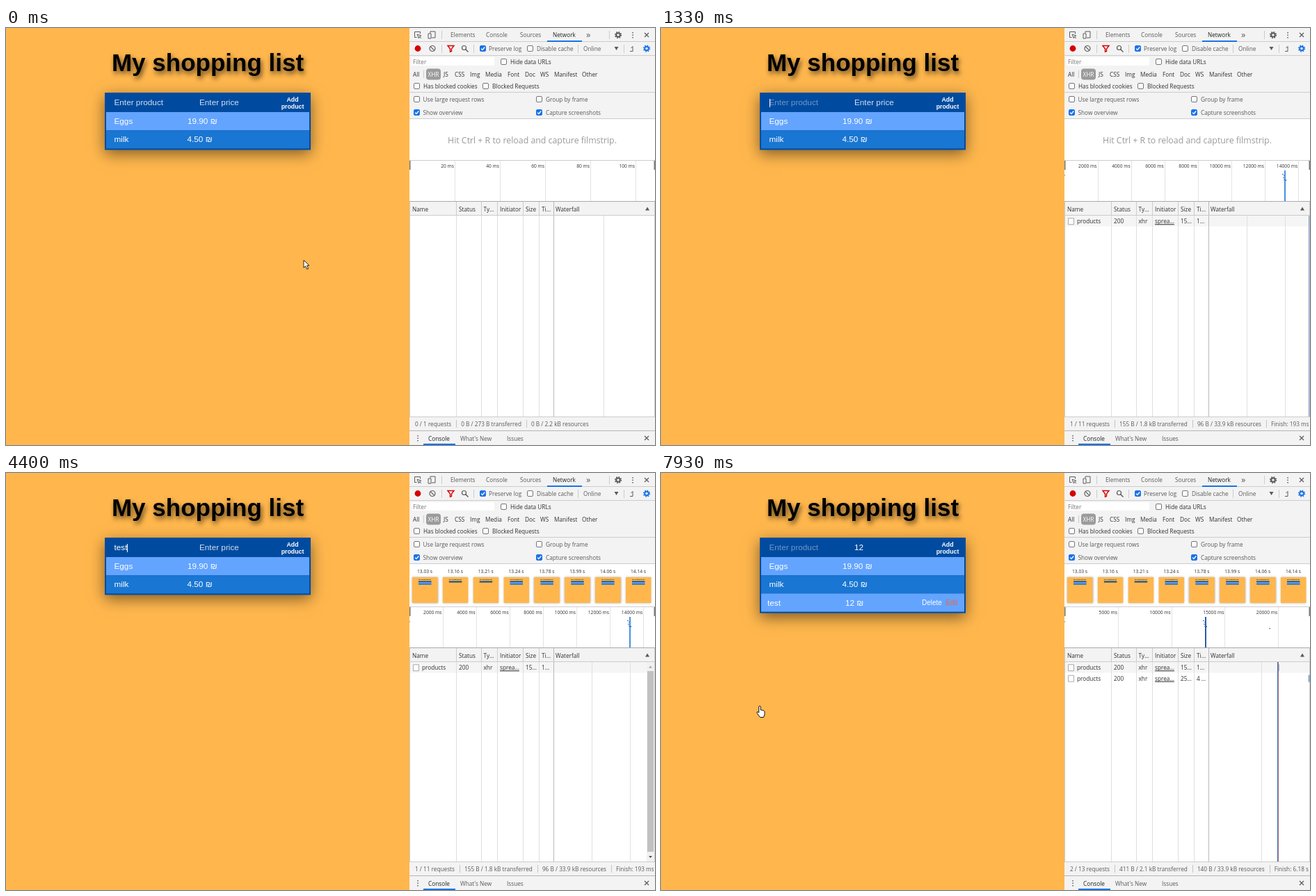
An HTML page with a canvas that plays this animation: 933 by 600 pixels, repeating every 8 s.

```html
<!DOCTYPE html>
<html lang="en">
<head>
<meta charset="utf-8">
<title>Shopping list</title>
<style>
html, body { margin: 0; height: 100%; overflow: hidden; }
canvas { display: block; }
</style>
</head>
<body>
<canvas width="933" height="600"></canvas>
<script>
const ctx = document.querySelector('canvas').getContext('2d');
const FPS = 15, FRAMES = 120;
const DARK = '#303030', GREY = '#5a5a5a', LINE = '#ccc', BAR = '#f3f3f3', BLUE = '#1a73e8';
const ui = px => `${px}px "Open Sans", sans-serif`;
const page = (px, weight = '') => `${weight} ${px}px "Liberation Sans", Arial, sans-serif`;

function rect(x, y, w, h, color) {
  ctx.fillStyle = color;
  ctx.fillRect(x, y, w, h);
}

function text(s, x, y, color = DARK, font = ui(8.25), align = 'left') {
  ctx.fillStyle = color;
  ctx.font = font;
  ctx.textAlign = align;
  ctx.fillText(s, x, y);
  return ctx.measureText(s).width;
}

function path(d, x, y, { fill, stroke, width = 1 }) {
  ctx.save();
  ctx.translate(x, y);
  const p = new Path2D(d);
  if (fill) { ctx.fillStyle = fill; ctx.fill(p); }
  if (stroke) { ctx.strokeStyle = stroke; ctx.lineWidth = width; ctx.stroke(p); }
  ctx.restore();
}

function ring(x, y, r, color, width, dash = []) {
  ctx.beginPath();
  ctx.arc(x, y, r, 0, 7);
  ctx.setLineDash(dash);
  ctx.strokeStyle = color;
  ctx.lineWidth = width;
  ctx.stroke();
  ctx.setLineDash([]);
}

function shadow(color, blur, dx, dy, draw) {
  ctx.save();
  Object.assign(ctx, { shadowColor: color, shadowBlur: blur, shadowOffsetX: dx, shadowOffsetY: dy });
  draw();
  ctx.restore();
}

// ---- Timeline (all times in frames) ----

const moves = [
  [[0, 428, 334], [1, 340, 305], [2, 281, 285], [16, 281, 285]],
  [[29, 281, 285], [33, 95, 223], [36, -30, 211]],
  [[100, 29, 214], [104, 155, 217], [113, 155, 217], [115, 118, 275],
   [116, 112, 305], [117, 114, 328], [118, 130, 335], [119, 142, 335], [121, 142, 335]]
];

function pointer(f) {
  for (const keys of moves) {
    for (let i = 1; i < keys.length; i++) {
      const [a, ax, ay] = keys[i - 1], [b, bx, by] = keys[i];
      if (f >= a && f < b) {
        const k = (f - a) / (b - a);
        return { x: ax + (bx - ax) * k, y: ay + (by - ay) * k };
      }
    }
  }
  return null;
}

// The pointer is shown offset and enlarged; this gives the spot it acts on.
const target = p => p ? { x: (p.x + 482) / 1.5, y: (p.y - 59) / 1.5 } : { x: -1, y: -1 };

// Each event: frame, focused field, product text, price text.
const events = [
  [0, '', '', ''], [19, 'product', '', ''],
  [57, 'product', 't', ''], [58, 'product', 'te', ''],
  [61, 'product', 'tes', ''], [66, 'product', 'test', ''],
  [71, 'price', 'test', ''], [91, 'price', 'test', '1'],
  [94, 'price', 'test', '12'], [105, 'product', '', '12']
];

// ---- Shopping list ----

const items = [['Eggs', '19.90 ₪', 261], ['milk', '4.50 ₪', 260.5], ['test', '12 ₪', 265]];

function field(name, value, x, focus, caretOn) {
  const focused = focus === name, font = page(11.75);
  const color = value ? '#fff' : focused ? '#7096c8' : '#d3dfee';
  const width = text(value || 'Enter ' + name, x, 111.2, color, font);
  if (focused && caretOn) rect(Math.round(x + (value ? width : 0)), 102, 1, 12, '#fff');
}

function drawList(f, at) {
  rect(0, 0, 580, 600, '#ffb74d');
  shadow('rgba(0,0,0,.65)', 7, 2, 4, () =>
    text('My shopping list', 290, 61.5, '#000', page(35, 'bold'), 'center'));

  const count = f >= 107 ? 3 : f >= 16 && f < 19 ? 0 : 2;
  const height = 30 + count * 26.2;
  shadow('rgba(0,0,0,.5)', 20, 0, 6, () => rect(142, 93, 296, height, '#004ba0'));

  const [start, focus, product, price] = events.filter(e => e[0] <= f).pop();
  const caretOn = Math.floor((f - start) / 8) % 2 === 0;
  field('product', product, 155.5, focus, caretOn);
  field('price', price, 278, focus, caretOn);
  text('Add', 412, 105.5, '#fff', page(8.8, 'bold'), 'center');
  text('product', 412, 116.3, '#fff', page(8.8, 'bold'), 'center');

  items.slice(0, count).forEach(([name, cost, x], i) => {
    const y = 121 + i * 26.2;
    const hover = at.x > 142 && at.x < 438 && at.y >= y && at.y < y + 26.2;
    rect(144, y, 292, 26.2, i % 2 ? '#1976d2' : '#63a4ff');
    text(name, hover ? 153 : 155.5, y + 17.2, '#fff', page(11.75));
    text(cost, x, y + 17.2, '#fff', page(11.75));
    if (hover) {
      text('Delete', 375, y + 16.6, at.x < 406 ? '#f4623a' : '#fff', page(10));
      text('Edit', 409, y + 16.6, at.x >= 406 ? '#f4623a' : '#fff', page(10));
    }
  });
}

// ---- Network panel ----

const networks = [
  { first: 645, step: 65, unit: 20, ticks: 5, grid: [859],
    status: ['0 / 1 requests', '0 B / 273 B transferred', '0 B / 2.2 kB resources'] },
  { first: 645, step: 65, unit: 20, ticks: 5, grid: [842, 897], mark: 896,
    status: ['0 / 7 requests', '0 B / 1.3 kB transferred', '0 B / 24.5 kB resources', 'Finish: 82 ms', 'DOMContentLoaded: 82 ms'] },
  { first: 627.5, step: 48.1, unit: 2000, ticks: 7, grid: [842, 897], mark: 896,
    rows: [['15…', '1…', 931]],
    status: ['1 / 11 requests', '155 B / 1.8 kB transferred', '96 B / 33.9 kB resources', 'Finish: 193 ms'] },
  { first: 657, step: 76.7, unit: 5000, ticks: 4, grid: [863], mark: 782,
    rows: [['15…', '1…', 887], ['25…', '4 …', 931]],
    status: ['2 / 13 requests', '411 B / 2.1 kB transferred', '140 B / 33.9 kB resources', 'Finish: 6.18 s'] }
];
const columns = [584, 651, 686.5, 710, 747, 770, 790];

function hline(y, color = LINE) { rect(580, y, 353, 1, color); }
function vline(x, y, h, color = LINE) { rect(Math.round(x), y, 1, h, color); }

function checkbox(x, y, label, labelX, checked, color = GREY) {
  ctx.beginPath();
  ctx.roundRect(x + .5, y + .5, 8, 8, 1.5);
  ctx.fillStyle = checked ? BLUE : '#fff';
  ctx.fill();
  ctx.strokeStyle = checked ? BLUE : '#767676';
  ctx.lineWidth = 1;
  ctx.stroke();
  if (checked) path('M2 4.6l1.9 1.9 3.4-4', x, y, { stroke: '#fff', width: 1.3 });
  text(label, labelX, y + 7.8, color);
}

function gear(x, y, color) {
  ring(x, y, 2.8, color, 2);
  ring(x, y, 4.3, color, 1.7, [1.7, 1.68]);
}

function dots(x, y) {
  for (const dy of [-4, -.5, 3]) rect(x - .7, y + dy, 1.5, 1.5, GREY);
}

function cross(x, y) {
  path('M-3-3l6 6M3-3l-6 6', x, y, { stroke: GREY, width: 1.2 });
}

function drawToolbars(f) {
  rect(580, 0, 353, 600, BAR);

  path('M8.5 3.5v-3h-8v8h3M4 4l6 2.3-2.6 1L6.5 10zM7.5 7.5l2.5 2.5', 587, 5, { stroke: GREY });
  path('M3.5 2.5v-2h7v9h-5M.5 3.5h4v7h-4z', 606.5, 4.5, { stroke: GREY });
  const tabs = [['Elements', 639], ['Console', 690], ['Sources', 739], ['Network', 786]];
  tabs.forEach(([s, x]) => text(s, x, 13, s === 'Network' ? '#222' : GREY));
  text('»', 834, 13.5, GREY, ui(13));
  gear(880, 10, GREY);
  dots(901, 10);
  cross(921, 10);
  hline(19);
  rect(778, 18, 50, 2, BLUE);

  ctx.beginPath();
  ctx.arc(592, 29.5, 4.4, 0, 7);
  ctx.fillStyle = '#d50000';
  ctx.fill();
  ring(613, 29.5, 4, GREY, 1.2);
  path('M-2.8-2.8l5.6 5.6', 613, 29.5, { stroke: GREY, width: 1.2 });
  path('M-4.5-4h9L1 .5V4l-2 .7V.5z', 639.5, 29.5, { stroke: '#d50000', width: 1.4 });
  ring(658.5, 28.5, 3, GREY, 1.2);
  path('M2 2l4 4', 658.5, 28.5, { stroke: GREY, width: 1.4 });
  checkbox(681, 25, 'Preserve log', 694, true);
  checkbox(749, 25, 'Disable cache', 763, false);
  text('Online', 830, 33, GREY);
  path('M-3-2.5h6L0 2.5z', 877.5, 29.5, { fill: GREY });
  path('M1 4V-3l-2.5 2.5M-3 4h4', 900, 29.5, { stroke: GREY });
  gear(921, 29.5, BLUE);
  for (const x of [626, 867]) vline(x, 4, 12);
  for (const x of [626, 672, 822, 888]) vline(x, 24, 12);
  hline(39);

  if (f >= 14 && f < 16) rect(582, 41, 121, 14, '#dadce0');
  rect(583, 42, 119, 12, '#fff');
  text('Filter', 585, 52, '#757575');
  checkbox(711, 44, 'Hide data URLs', 725, false, DARK);

  ctx.beginPath();
  ctx.roundRect(604, 58.5, 21, 16, 4);
  ctx.fillStyle = '#9b9b9b';
  ctx.fill();
  vline(600, 61, 11);
  const types = [['All', 585], ['JS', 629], ['CSS', 645], ['Img', 667], ['Media', 689], ['Font', 721],
    ['Doc', 746], ['WS', 768], ['Manifest', 788], ['Other', 828]];
  types.forEach(([s, x]) => text(s, x, 70));
  text('XHR', 606.5, 70, '#fff');
  checkbox(586, 79, 'Has blocked cookies', 600, false, DARK);
  checkbox(685, 79, 'Blocked Requests', 699, false, DARK);
  hline(92);
  checkbox(586, 98, 'Use large request rows', 599.5, false);
  checkbox(762, 98, 'Group by frame', 776, false);
  checkbox(586, 117, 'Show overview', 599.5, true);
  checkbox(762, 117, 'Capture screenshots', 776, true);
  hline(130);
}

function drawFilmstrip(film) {
  rect(580, 131, 353, 62, '#fff');
  if (!film) {
    text('Hit Ctrl + R to reload and capture filmstrip.', 756.5, 166, '#9a9a9a', ui(12.35), 'center');
    return;
  }
  const times = [13.03, 13.16, 13.21, 13.24, 13.78, 13.99, 14.06, 14.14];
  times.forEach((time, i) => {
    const x = 584 + i * 43.85;
    text(time.toFixed(2) + ' s', x + 18, 143.5, DARK, ui(6.7), 'center');
    shadow('rgba(0,0,0,.35)', 3, 0, 0, () => rect(x, 150, 36.5, 37, '#ffb74d'));
    text('My shopping list', x + 18, 154.3, '#222', page(2.3, 'bold'), 'center');
    rect(x + 9, 155.5, 18.5, 2, '#004ba0');
    if (i !== 1 && i !== 2) {
      rect(x + 9, 157.2, 18.5, 1.7, '#63a4ff');
      rect(x + 9, 158.9, 18.5, 1.8, '#1976d2');
    }
  });
}

function drawOverview(net, y) {
  rect(580, y, 353, 60, '#fff');
  hline(y);
  for (let i = 0; i < net.ticks; i++) {
    const x = net.first + i * net.step;
    vline(x, y + 1, 58, '#e3e3e3');
    text(`${net.unit * (i + 1)} ms`, x - 1, y + 10.5, DARK, ui(6.7), 'right');
  }
  for (const x of [580, 931.5]) rect(x, y + 1, 1.5, 13, '#777');
  if (net.mark) {
    const late = net.mark < 800;
    rect(580, y + 21, 1, 2, '#90b8e8');
    rect(net.mark, y + 15, net.rows ? 2 : 1, 44, late ? '#2c5aa8' : '#4a90e2');
    for (const [dx, dy] of [[-3, 20], [-1, 22], [-2, 25], [-1, 28]])
      rect(net.mark + dx, y + dy, 2, 1, '#3b78c4');
    if (net.rows) rect(net.mark + 2, y + 28, 1, 2, '#3b78c4');
    if (late) rect(874.5, y + 31, 1.5, 1.5, '#3b78c4');
  }
  hline(y + 59, '#aaa');
}

function drawTable(net, y, scrollbar) {
  const rows = net.rows || [];
  rect(580, y, 353, 559 - y, '#fff');
  rect(580, y, 353, 19, BAR);
  rows.forEach((row, i) => { if (i % 2 === 0) rect(581, y + 20, 351, 15.5, '#f5f5f5'); });
  for (const x of net.grid) vline(x, y + 20, 539 - y, '#e0e0e0');
  for (const x of [647, 683, 706, 743, 766]) {
    vline(x, y, 19, LINE);
    vline(x, y + 20, 539 - y, '#dedede');
  }
  vline(786.5, y, 559 - y, '#b8b8b8');
  hline(y + 19);
  ['Name', 'Status', 'Ty…', 'Initiator', 'Size', 'Ti…', 'Waterfall'].forEach((s, i) =>
    text(s, columns[i], y + 13.5));
  path('M-3 2.5h6L0-2.5z', 922, y + 10, { fill: GREY });

  rows.forEach(([size, time, barX], i) => {
    const base = y + 31.2 + i * 15.5;
    path('M.5.5h8v9h-8z', 585, base - 8, { fill: '#fff', stroke: '#aaa' });
    text('products', 598, base);
    text('200', columns[1], base);
    text('xhr', columns[2], base);
    const width = text('sprea…', columns[3], base);
    rect(columns[3], base + 1, width, 1, DARK);
    text(size, columns[4], base);
    text(time, columns[5], base);
    if (!scrollbar) rect(barX, base - 8, 1.5, 10, '#3b78c4');
  });
  if (net.mark < 800) {
    rect(886, y + 20, 1, 539 - y, '#3f6fb5');
    rect(887, y + 20, 1, 539 - y, '#b07a78');
  } else if (net.mark && !scrollbar) {
    rect(931, y + 20, 1, 539 - y, '#7f97c8');
  }
  if (scrollbar) {
    rect(921, y + 20, 11, 539 - y, '#f1f1f1');
    rect(922, y + 33, 9, 260, '#c1c1c1');
    path('M-2.5 1.5h5L0-1.5z', 926.5, y + 27, { fill: '#a3a3a3' });
    path('M-2.5-1.5h5L0 1.5z', 926.5, 552.5, { fill: '#505050' });
  }
  vline(580, y, 559 - y, LINE);
  vline(932, y, 559 - y, LINE);
}

function drawFooter(net) {
  rect(580, 559, 353, 41, BAR);
  hline(559);
  ctx.save();
  ctx.beginPath();
  ctx.rect(580, 559, 351, 20);
  ctx.clip();
  let x = 588;
  net.status.forEach((s, i) => {
    if (i) { vline(x, 564, 11, '#c4c4c4'); x += 7; }
    x += text(s, x, 573, i === 4 ? BLUE : GREY) + 7;
  });
  ctx.restore();
  hline(579, '#b5b5b5');
  dots(592, 590);
  text('Console', 607, 593.5, '#222');
  text("What's New", 653, 593.5, GREY);
  text('Issues', 720, 593.5, GREY);
  cross(921, 590);
  rect(600, 598, 46, 2, BLUE);
}

// ---- Pointer ----

function drawPointer(p, at) {
  const inTable = at.x > 142 && at.x < 438;
  const header = inTable && at.y >= 93 && at.y < 121;
  const onButton = inTable && at.y >= 173 && at.y < 199 && at.x > 375 && at.x < 428;
  if (header && at.x < 392) {
    path('M-2.5-5.5q2.5 0 2.5 1.5v8q0 1.5-2.5 1.5M2.5-5.5q-2.5 0-2.5 1.5M0 4q0 1.5 2.5 1.5', p.x, p.y, { stroke: '#333' });
  } else if (header || onButton) {
    path('M-1.3 1q1.3-2 2.6 0v5l2.2.2 2 .7 1.5 1.3v4l-1.4 4.3h-5.2l-4.4-6.2q-.6-2.4 1.5-1.5l1.2 1.2z', p.x, p.y,
      { fill: '#fff', stroke: '#111' });
  } else {
    path('M0 0v11l2.6-2.4 2 4.4 2-.8-2-4.4h3.4z', p.x, p.y, { fill: '#fff', stroke: '#111', width: .9 });
  }
}

function draw(now) {
  const f = Math.floor((now % 8000) * FPS / 1000 + .06) % FRAMES;
  const p = pointer(f), at = target(p);
  const net = networks[f < 17 ? 0 : f < 19 ? 1 : f < 109 ? 2 : 3];
  const film = f >= 34, top = film ? 192 : 190;
  drawList(f, at);
  drawToolbars(f);
  drawFilmstrip(film);
  drawOverview(net, top);
  drawTable(net, top + 60, film && f < 109);
  drawFooter(net);
  if (p) drawPointer(p, at);
}

const begin = performance.now();
function loop() {
  draw(performance.now() - begin);
  requestAnimationFrame(loop);
}
loop();
</script>
</body>
</html>
```
